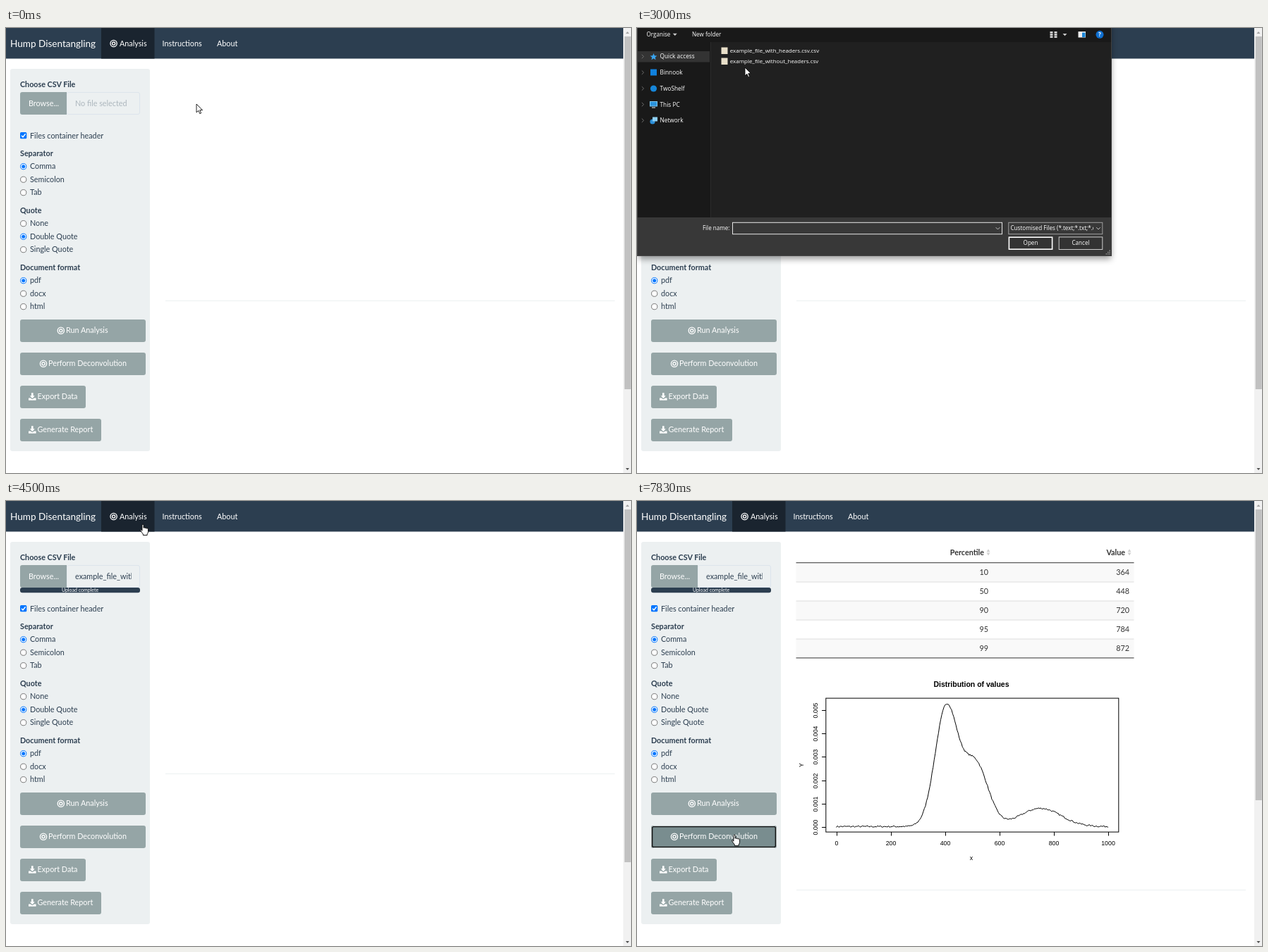
Write an HTML page that moves like this. It is 886 px wide and 632 px high and loops after 8000 ms.

```html
<!DOCTYPE html>
<html lang="en">
<head>
<meta charset="utf-8">
<title>Analysis walkthrough</title>
<style>
  html, body { margin: 0; width: 100%; height: 100%; overflow: hidden; background: #fff; }
  svg { display: block; font-family: Lato, sans-serif; font-size: 10.8px; cursor: default; }
  #dialog { font-family: "Open Sans", sans-serif; font-size: 8.1px; }
  #plot { font-family: "Liberation Sans", Arial, sans-serif; font-size: 8.8px; }
</style>
</head>
<body>
<svg id="stage" width="886" height="632" viewBox="0 0 886 632"></svg>
<script>
const LOOP = 8000;
const INK = '#2c3e50', GREY = '#95a5a6', HOVER = '#798d8f', PRESS = '#687c7e', BLUE = '#0075ff';

// Markup helpers; text is placed by the middle of its capitals
const rect = (x, y, w, h, fill, more = '') =>
  `<rect x="${x}" y="${y}" width="${w}" height="${h}" fill="${fill}" ${more}/>`;
const path = (d, more = '') => `<path d="${d}" ${more}/>`;
const text = (x, cy, s, fill = INK, size = 10.8, more = '') =>
  `<text x="${x}" y="${cy + size * 0.35}" fill="${fill}" font-size="${size}" ${more}>${s}</text>`;
const bold = 'font-weight="700" ', mid = 'text-anchor="middle" ', end = 'text-anchor="end" ';
const stroke = (c, w = 1) => `fill="none" stroke="${c}" stroke-width="${w}"`;

const target = (x, y) => `<g ${stroke('#fff', 1.35)}><circle cx="${x}" cy="${y}" r="4.6"/><circle cx="${x}" cy="${y}" r="2.05"/></g>`;
const download = (x, y) => path(
  'M192 0h128v192h104L256 384 88 192h104zM0 352h140l76 72h80l76-72h140v160H0z',
  `fill="#fff" transform="translate(${x} ${y - 5.4}) scale(.0207)"`);

function button(id, y, w, label, tx, icon) {
  return rect(20, y, w, 32, GREY, `rx="3" id="${id}"`) + icon + text(tx, y + 15.7, label, '#fff');
}

function radios(title, y, labels, on) {
  return text(20, y, title, INK, 10.75, bold) + labels.map((s, i) => {
    const cy = y + 18.7 + i * 18.5;
    const dot = i === on ? `<circle cx="24.7" cy="${cy}" r="2.5" fill="${BLUE}"/>` : '';
    return `<circle cx="24.7" cy="${cy}" r="4.1" fill="#fff" stroke="${i === on ? BLUE : '#767676'}" stroke-width="1"/>` +
      dot + text(34, cy, s);
  }).join('');
}

function navbar() {
  return rect(0, 0, 875, 43.5, INK) + rect(135, 0, 75.5, 43.5, '#1a242f') +
    text(6, 22, 'Hump Disentangling', '#fff', 13.55) + target(152.6, 22) +
    text(161, 22, 'Analysis', '#fff') + text(221.5, 22, 'Instructions', '#fff') + text(299, 22, 'About', '#fff');
}

function sidebar() {
  return rect(6, 58, 198, 543, '#ecf0f1', 'rx="3"') +
    text(20, 80, 'Choose CSV File', INK, 10.75, bold) +
    rect(86, 91.5, 103.5, 31, '#ecf0f1', 'rx="2.5" stroke="#dce4ec"') +
    path('M23 91H86V123H23Q20 123 20 120V94Q20 91 23 91Z', `id="browse" fill="${GREY}"`) +
    text(32, 107, 'Browse...', '#fff') +
    text(98, 107.7, 'No file selected', '#acb6bd', 10.8, 'id="empty"') +
    `<g id="uploaded"><g clip-path="url(#field)">${text(98, 107.7, 'example_file_with_headers.csv.csv')}</g>` +
    rect(20, 123, 170, 7.2, INK, 'rx="3"') + text(105, 126.8, 'Upload complete', '#fff', 7, mid) + '</g>' +
    rect(20, 148, 9.3, 9.3, BLUE, 'rx="1.6"') + path('M22 152.8L24 154.9L27.6 150.3', stroke('#fff', 1.4)) +
    text(34, 152.8, 'Files container header') +
    radios('Separator', 178, ['Comma', 'Semicolon', 'Tab'], 0) +
    radios('Quote', 259, ['None', 'Double Quote', 'Single Quote'], 1) +
    radios('Document format', 340, ['pdf', 'docx', 'html'], 0) +
    button('run', 414, 178, 'Run Analysis', 85, target(77.8, 429.8)) +
    button('perform', 461, 178, 'Perform Deconvolution', 60, target(53, 476.8)) +
    button('export', 508, 93, 'Export Data', 44.5, download(32, 523.6)) +
    button('report', 555, 115, 'Generate Report', 44.5, download(32, 570.6)) +
    `<g id="ring">${rect(20.5, .5, 177, 31, 'none', 'rx="3" stroke="#b9c2c3"')}` +
    rect(21.6, 1.6, 174.8, 28.8, 'none', 'rx="2" stroke="#101010" stroke-width="1.4"') + '</g>';
}

function table() {
  const rows = [[10, 364], [50, 448], [90, 720], [95, 784], [99, 872]];
  const sort = x => path(`M${x} 72.2l2.5-4 2.5 4zM${x} 73.6l2.5 4 2.5-4z`, 'fill="#d0d0d0"');
  return text(492, 73, 'Percentile', '#333', 10.75, bold + end) + sort(495.5) +
    text(692, 73, 'Value', '#333', 10.75, bold + end) + sort(695.5) +
    rows.map(([p, v], i) => {
      const y = 88 + i * 27;
      return rect(225.5, y, 479, 27, i % 2 ? '#fff' : '#f9f9f9') +
        (i ? rect(225.5, y - .5, 479, 1, '#ddd') : '') +
        text(498, y + 13.4, p, '#333', 10.8, end) + text(698, y + 13.4, v, '#333', 10.8, end);
    }).join('') +
    rect(225.5, 87.2, 479, 1, '#333') + rect(225.5, 222.4, 479, 1, '#333');
}

function plot() {
  const px = x => 282.5 + x * .3855, py = v => 463 - v * 33.2;
  const bell = (x, a, m, s) => a * Math.exp(-(((x - m) / s) ** 2) / 2);
  let seed = 7, line = '', axes = '';
  const noise = () => ((seed = seed * 16807 % 2147483647) / 2147483647 - .5) * .07;
  for (let x = 0; x <= 1000; x += 4) {
    const v = .02 + noise() + bell(x, 5.03, 404, 41) + bell(x, 2.75, 510, 47) + bell(x, .78, 751, 75);
    line += `${x ? 'L' : 'M'}${px(x).toFixed(2)} ${py(v).toFixed(2)}`;
  }
  for (let i = 0; i <= 5; i++) {
    const x = Math.round(px(i * 200)) + .5, y = Math.round(py(i)) + .5;
    axes += path(`M${x} 470v5.5M268 ${y}h-6`, stroke('#000')) + text(x - .5, 486, i * 200, '#000', 8.8, mid) +
      `<g transform="translate(252.5 ${y}) rotate(-90)">${text(0, 0, '0.00' + i, '#000', 8.8, mid)}</g>`;
  }
  return '<g id="plot">' + text(474, 260, 'Distribution of values', '#000', 10.47, bold + mid) +
    rect(267.8, 280.1, 415, 190, 'none', 'stroke="#000"') + axes + path(line, stroke('#000')) +
    text(474, 506.5, 'x', '#000', 8.8, mid) +
    `<g transform="translate(233 375) rotate(-90)">${text(0, 0, 'Y', '#000', 8.8, mid)}</g></g>`;
}

function scrollbar() {
  return rect(875, 0, 11, 632, '#f1f1f1') + rect(876.8, 12, 9, 501, '#c1c1c1', 'id="thumb"') +
    path('M878.5 8l2.5-3 2.5 3z', 'fill="#a3a3a3"') + path('M878.5 625l2.5 3 2.5-3z', 'fill="#505050"');
}

function dialog() {
  const t = (x, cy, s, more = '', size = 8.1) => text(x, cy, s, '#fff', size, more);
  const caret = (x, y) => path(`M${x - 3} ${y - 1.5}h6l-3 3.2z`, 'fill="#ccc"');
  const chevron = (x, y) => path(`M${x - 2.8} ${y - 1.3}l2.8 2.8 2.8-2.8`, stroke('#ccc', .9));
  const icons = [
    path('M23.5 36l1.4 3.2 3.5.3-2.7 2.3.9 3.4-3.1-1.9-3.1 1.9.9-3.4-2.7-2.3 3.5-.3z', 'fill="#3aa5f0"'),
    rect(19, 58.5, 9, 9, '#1081de'),
    '<circle cx="23.5" cy="86" r="4.6" fill="#1686d9"/>',
    rect(18, 104, 11, 7.5, '#7cc8f5') + rect(19, 105, 9, 5.5, '#2a93dd') + rect(21, 112.5, 5, 1.2, '#ccc'),
    '<circle cx="22" cy="133" r="3.6" fill="#2b8fd8"/>' + rect(22, 126.5, 7, 6, '#8fd0f7')
  ];
  const places = ['Quick access', 'Binnook', 'TwoShelf', 'This PC', 'Network'].map((s, i) => {
    const y = 40.5 + i * 22.7;
    return path(`M6.8 ${y - 2.7}l2.8 2.7-2.8 2.7`, stroke('#777', .9)) + icons[i] + t(32.5, y, s, '', 8.3);
  }).join('');
  const files = ['example_file_with_headers.csv.csv', 'example_file_without_headers.csv'].map((s, i) =>
    rect(119.5, 27.5 + i * 15, 9, 9.5, '#e9dfc9') + t(131.8, 31.8 + i * 15, s, '', 7.95)).join('');
  let view = '', grip = '';
  for (const x of [585.5, 591.5]) for (const y of [5, 8.2, 11.4]) view += rect(x, y, 4, 2.5, '#ddd');
  for (let i = 0; i < 3; i++) for (let j = 0; j <= i; j++) grip += rect(669.5 - j * 2.4, 315.5 + i * 2.4, 1.3, 1.3, '#aaa');
  return '<g id="dialog">' +
    rect(2, -60, 670, 388, '#000', 'opacity=".4" style="filter:blur(5px)"') +
    rect(0, -63, 673, 387, '#202020') + rect(0, -63, 673, 83, '#191919') + rect(0, 20, 104, 249, '#191919') +
    rect(104, 20, 1, 249, '#2b2b2b') + rect(0, 269, 673, 55, '#383838') +
    rect(.5, -63, 672, 386.5, 'none', 'stroke="#4a4a4a" stroke-width=".8"') +
    rect(1, 33, 102, 15.5, '#333') + rect(1, 101, 102, 15.5, '#4d4d4d', 'id="placeHover"') +
    rect(115, 25, 149, 14, '#4d4d4d', 'id="row1"') + rect(115, 40, 149, 14, '#4d4d4d', 'id="row2"') +
    t(13.5, 9.3, 'Organise') + caret(53.8, 9.3) + t(78, 9.3, 'New folder') + view + caret(606.5, 9.5) +
    rect(625.5, 5, 10.5, 8.5, '#eee') + rect(631, 6.5, 4.5, 6.5, '#1a86d8') +
    '<circle cx="656" cy="9.3" r="5.5" fill="#0f6fd0"/>' + t(656, 9.3, '?', mid + bold) +
    places + files + t(131.5, 284.2, 'File name:', end) +
    rect(135.5, 276.3, 382, 16.4, '#383838', 'stroke="#e6e6e6"') + chevron(511.5, 284.5) +
    t(138, 284.2, 'example_file_with_headers.csv.csv', 'id="picked"', 7.95) +
    rect(526.8, 276.3, 133, 16.4, '#383838', 'stroke="#a0a0a0"') + chevron(654, 284.5) +
    `<g clip-path="url(#kinds)">${t(529.5, 284.2, 'Customised Files (*.text;*.txt;*.csv)')}</g>` +
    rect(527.4, 297.2, 61.2, 17, '#333', 'stroke="#fff" stroke-width="1.6"') + t(558, 305.6, 'Open', mid) +
    rect(598.2, 296.9, 61.6, 17.6, '#333', 'stroke="#ccc"') + t(629, 305.6, 'Cancel', mid) +
    grip + '</g>';
}

function cursors() {
  const look = 'fill="#fff" stroke="#000" stroke-linejoin="round"';
  return '<g id="cursor">' +
    path('M0 0V16.5L4 13L6.6 19L9.2 17.9L6.6 12H11.8Z', `id="arrow" ${look} stroke-width="1.2" transform="scale(.72)"`) +
    path('M4 13V2.2Q4 .6 5.5 .6Q7 .6 7 2.2V7.6Q7 6.4 8.5 6.6Q10 6.8 10 8.2Q10.3 7 11.6 7.3Q13 7.6 13 9' +
      'Q13.4 8 14.6 8.3Q16 8.6 16 10.2V15Q16 17.5 14 19.5V22H6V19.8Q3.5 17 .9 12.6Q.4 11 1.8 10.8Q3 10.8 4 13Z',
      `id="hand" ${look} stroke-width="1.3" transform="scale(.72) translate(-5.5 -.3)"`) +
    `<g id="busy" transform="translate(10 1)"><circle r="4" ${stroke('#1577cf', 2.2)}/>` +
    path('M0 -4A4 4 0 0 1 4 0', stroke('#6fc0ff', 2.2) + ' id="spin"') + '</g></g>';
}

document.getElementById('stage').innerHTML =
  `<defs><clipPath id="field">${rect(90, 92, 88, 30, '#000')}</clipPath>` +
  `<clipPath id="kinds">${rect(528, 277, 119, 15, '#000')}</clipPath></defs>` +
  rect(0, 0, 886, 632, '#fff') + navbar() + sidebar() + rect(226, 387, 637, 1, '#ecf0f1', 'id="rule"') +
  `<g id="results">${table()}${plot()}</g>` + scrollbar() + dialog() + cursors();

const ui = {};
document.querySelectorAll('[id]').forEach(e => ui[e.id] = e);
const show = (e, on) => e.setAttribute('visibility', on ? 'visible' : 'hidden');
const set = (e, k, v) => e.setAttribute(k, v);
const ramp = (t, a, b) => Math.min(1, Math.max(0, (t - a) / (b - a)));
const between = (t, a, b) => t >= a && t < b;

// Pointer moves: start, end, from, to, steady pace
const moves = [
  [890, 1640, 270, 108, 63, 112],
  [2710, 3132, 63, 112, 194, 31, true],
  [4500, 5010, 194, 33, 139, 438],
  [5040, 5240, 139, 438, 139, 434],
  [6880, 6881, 139, 434, 139, 431],
  [7280, 7460, 139, 431, 138, 474]
];
const CLOSE = [3674, 3894];

function pointer(t) {
  let [, , x, y] = moves[0];
  for (const [a, b, x0, y0, x1, y1, steady] of moves) {
    if (t < a) break;
    const u = ramp(t, a, b), s = steady ? u : u * u * (3 - 2 * u);
    x = x0 + (x1 - x0) * s;
    y = y0 + (y1 - y0) * s;
  }
  return [Math.round(x), Math.round(y)];
}

function render(t) {
  const [x, y] = pointer(t);
  const over = (l, top, r, b) => x >= l && x < r && y >= top && y < b;
  const opening = ramp(t, 2220, 2440), closing = ramp(t, ...CLOSE);
  const modal = between(t, 1820, CLOSE[1]);
  const open = t >= 2220 && closing < 1;

  // File dialog
  const alpha = closing ? 1 - closing : opening;
  const size = closing ? 1 - .048 * closing : .93 + .07 * (1 - (1 - opening) ** 2);
  show(ui.dialog, open);
  set(ui.dialog, 'opacity', alpha);
  set(ui.dialog, 'transform', `translate(336 130) scale(${size}) translate(-336 -130)`);
  ui.placeHover.style.opacity = +over(0, 101, 104, 117);
  ui.row1.style.opacity = +over(115, 25, 264, 39);
  ui.row2.style.opacity = +over(115, 39, 264, 54);
  set(ui.row1, 'fill', t >= 3140 ? '#777' : '#4d4d4d');
  ui.picked.style.opacity = +(t >= 3140);

  // Sidebar
  const loaded = t >= 4060;
  show(ui.empty, !loaded);
  show(ui.uploaded, loaded);
  const onBrowse = over(20, 91, 86, 123), onRun = over(20, 414, 198, 446), onPerform = over(20, 461, 198, 493);
  const focus = t >= 7730 ? 'perform' : t >= 5470 ? 'run' : '';
  const tone = (id, hot, press) => set(ui[id], 'fill', press ? PRESS : hot || focus === id ? HOVER : GREY);
  tone('browse', modal || onBrowse);
  tone('run', onRun, between(t, 5470, 5590));
  tone('perform', onPerform, between(t, 7730, 7830));
  show(ui.ring, focus);
  set(ui.ring, 'transform', `translate(0 ${focus === 'perform' ? 461 : 414})`);

  // Results
  const done = t >= 6030;
  show(ui.results, done);
  set(ui.rule, 'y', done ? 552 : 387);
  set(ui.thumb, 'height', done ? 413 : 501);

  // Pointer
  const hand = !modal && (onBrowse || onRun || onPerform || over(135, 0, 340, 43));
  show(ui.hand, hand);
  show(ui.arrow, !hand);
  show(ui.busy, between(t, 1820, 2600) || between(t, 3360, CLOSE[0]));
  set(ui.spin, 'transform', `rotate(${t * .5 % 360})`);
  set(ui.cursor, 'transform', `translate(${x} ${y})`);
}

function tick(now) {
  render(now % LOOP);
  requestAnimationFrame(tick);
}
render(0);
requestAnimationFrame(tick);
</script>
</body>
</html>
```
